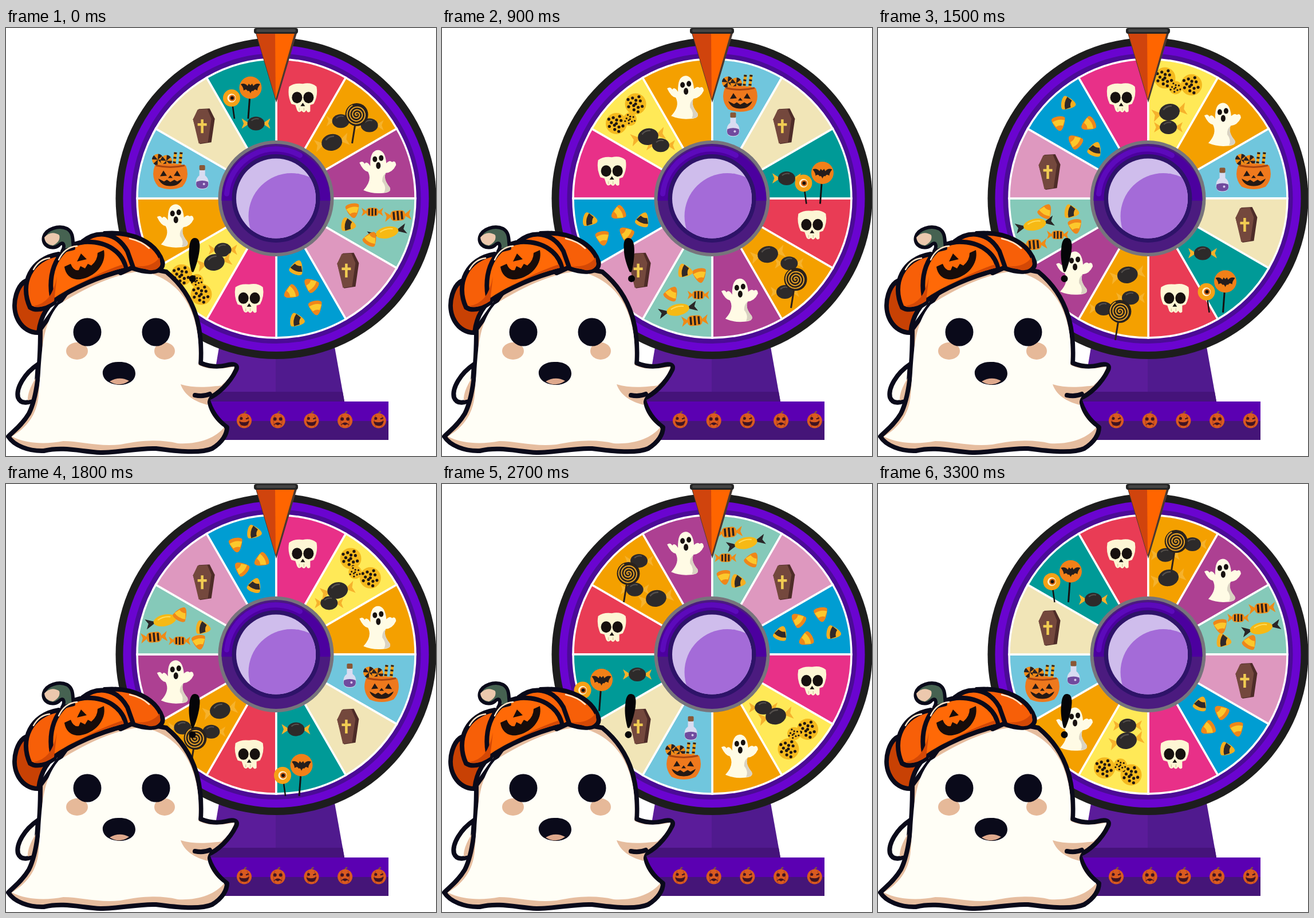
An HTML page for the animation above (3.6 s loop, 751 by 746 pixels).

```html
<!DOCTYPE html>
<html lang="en">
<head>
<meta charset="utf-8">
<title>Halloween wheel</title>
<style>
  html, body { margin: 0; width: 100%; height: 100%; overflow: hidden; background: #fff; }
  svg { display: block; width: 100vw; height: 100vh; }
  .ink { stroke: #0a0a1a; stroke-width: 8; stroke-linejoin: round; stroke-linecap: round; }
</style>
</head>
<body>
<svg viewBox="0 0 751 746">
  <!-- stand -->
  <path d="M374 545H471V651H356Z" fill="#5b1c9a"/>
  <path d="M471 545H572L591 651H471Z" fill="#501a8e"/>
  <path d="M358 634H588L591 651H355Z" fill="#45137a"/>
  <path d="M355 651H668V685H355Z" fill="#5b00b2"/>
  <path d="M355 685H668V718H355Z" fill="#451578"/>
  <g id="badges"></g>

  <!-- wheel -->
  <g transform="translate(471.5 297)">
    <circle r="280" fill="#1d1d1d"/>
    <circle r="267" fill="#6a04d0"/>
    <circle r="253" fill="#4b0b96"/>
  </g>
  <g transform="translate(472 297)">
    <g id="sectors" stroke="#fff" stroke-width="3.5"></g>
  </g>
  <g id="prizes"></g>
  <g transform="translate(471.5 297)">
    <circle r="101" fill="#77747c"/>
    <circle r="95" fill="#4b1b7f"/>
    <path d="M-95 4A95 95 0 0 1 95 4Z" fill="#4c009f"/>
    <path d="M-86-8A86 86 0 0 1 42-75" fill="none" stroke="#5c0abb" stroke-width="9" stroke-linecap="round"/>
    <circle r="77" fill="#2e1369"/>
    <circle r="69.5" fill="#cfbdec"/>
    <clipPath id="ball"><circle r="69.5"/></clipPath>
    <circle cx="27" cy="31" r="75" fill="#a46bd8" clip-path="url(#ball)"/>
  </g>

  <!-- pointer -->
  <path d="M436 9H508L472 130Z" fill="#4a3830"/>
  <path d="M437 9H471V124Z" fill="#d0440d"/>
  <path d="M470 9H504L471 124Z" fill="#ff6500"/>
  <rect x="433" width="77" height="10" rx="4" fill="#242424"/>
  <rect x="437" y="2" width="69" height="5" rx="2.5" fill="#444"/>

  <g id="alert" fill="#050508">
    <path d="M0-35C8-35 10-25 9-13C8 1 4 17 1 24Q-2 26-3 22C-6 12-10-2-9-16C-9-27-7-35 0-35Z"/>
    <circle cy="36" r="6"/>
  </g>

  <!-- ghost -->
  <path class="ink" d="M56 586C32 602 17 628 21 644C26 657 42 654 52 645Z" fill="#fffef6"/>
  <path d="M52 610Q37 634 38 649L52 646Z" fill="#e6bd9f"/>
  <path class="ink" d="M60 525C60 580 56 640 40 672C28 692 14 702 4 712C14 728 40 738 66 737C100 729 130 738 165 740C200 740 230 732 262 733C300 738 340 742 360 733C378 722 386 708 386 696C370 684 358 668 352 646C370 639 390 620 402 596C406 587 398 584 384 588C365 593 350 588 340 584C343 530 335 470 280 425L150 400Z" fill="#e6bd9f"/>
  <path d="M60 600C63 560 64 515 92 482C150 446 200 426 240 424C310 440 342 500 336 587C350 595 372 596 399 590C395 606 380 625 350 640C352 668 364 684 381 696C366 715 335 726 300 724C270 717 240 718 200 726C160 730 130 720 100 720C70 726 36 725 10 712C34 698 54 676 57 640Z" fill="#fffef6"/>
  <path d="M305 621C330 629 360 625 378 623C366 633 350 641 352 657C330 651 312 641 305 621Z" fill="#e6bd9f"/>
  <path class="ink" d="M330 640Q344 643 356 638" fill="none"/>
  <g fill="#e6b999">
    <ellipse cx="124" cy="563" rx="19" ry="15"/>
    <ellipse cx="277" cy="563" rx="18" ry="15"/>
  </g>
  <g fill="#0a0a1a">
    <circle cx="142" cy="530" r="24.5"/>
    <circle cx="262" cy="530" r="24.5"/>
    <path d="M169 598C172 587 184 581 199 582C216 582 226 591 226 602C226 615 213 622 199 622C182 622 167 613 169 598Z"/>
  </g>
  <path d="M181 616Q198 606 215 615Q198 627 181 616Z" fill="#dfa98d"/>

  <!-- pumpkin beret -->
  <g class="ink">
    <path d="M57 531C28 532 7 500 18 464C24 445 36 435 50 440L80 479Q60 500 57 531Z" fill="#c84104"/>
    <path d="M42 487C23 446 43 402 92 394L112 405L84 479Q58 497 42 487Z" fill="#f75f08"/>
    <path d="M172 358C222 354 262 374 273 407C278 424 254 430 222 419Z" fill="#f75f08"/>
    <path d="M134 372C158 353 192 354 212 389L222 417L200 427Z" fill="#fb6206"/>
    <path d="M82 477C69 427 91 377 137 373C178 371 205 392 210 421C167 432 121 450 82 477Z" fill="#ff6907"/>
    <path d="M98 389C104 379 100 370 92 379C80 388 62 379 66 364C70 350 92 343 107 350C119 357 116 372 118 384Z" fill="#466251" stroke-width="6"/>
  </g>
  <g fill="#d34806">
    <path d="M48 484Q80 481 89 433L84 476Q62 491 48 484Z"/>
    <path d="M87 470Q150 430 204 412L206 418Q145 432 87 470Z"/>
    <path d="M225 415Q255 418 268 400Q274 424 250 422Z"/>
  </g>
  <path d="M67 365Q79 352 93 361Q96 372 82 379Q68 377 67 365Z" fill="#ecc8ad"/>
  <path d="M48 421Q58 403 76 401M92 404Q102 382 124 380M216 367Q238 372 250 384" fill="none" stroke="#ffe4c8" stroke-width="2.5" stroke-linecap="round"/>
  <path d="M102 416L113 411Q118 424 127 422L130 415L138 419L143 411L149 414Q160 405 160 392L171 387C176 412 155 434 130 438C114 440 104 430 102 416ZM131 393L141 403L124 407Z" fill="#170c0a"/>
</svg>

<script>
const HUB = { x: 471.5, y: 297 };
const STEP_MS = 300;
const byId = id => document.getElementById(id);
const at = (x, y, art, extra = '') => `<g transform="translate(${x} ${y}) ${extra}">${art}</g>`;
const path = (d, fill) => `<path d="${d}" fill="${fill}"/>`;
const line = (d, color, width, dash = 'none') =>
  `<path d="${d}" fill="none" stroke="${color}" stroke-width="${width}" stroke-dasharray="${dash}"/>`;
const oval = (x, y, rx, ry, fill) => `<ellipse cx="${x}" cy="${y}" rx="${rx}" ry="${ry}" fill="${fill}"/>`;
const dot = (x, y, r, fill) => oval(x, y, r, r, fill);

// Prize artwork, each drawn around its own centre.
const ends = (w, h, fill) =>
  path(`M${-w * .45} 0L${-w}-${h}L${-w * .86} 0L${-w} ${h}ZM${w * .45} 0L${w}-${h}L${w * .86} 0L${w} ${h}Z`, fill);

const blackCandy = ends(25, 9, '#f6b22c') + oval(0, 0, 15, 12, '#2d2a2a') +
  line('M-8-5Q-2-10 5-8', '#55504d', 2);

const twist = ends(23, 9, '#f08a16') +
  '<rect x="-13" y="-9" width="26" height="18" rx="7" fill="#f08a16"/>' +
  line('M-7-7V7M0-8V8M7-7V7', '#29201f', 3.5);

const goldCandy = ends(34, 9, '#292627') + oval(0, 0, 20, 10, '#f6b914') +
  line('M-12-3Q0-8 11-4', '#ffdc5a', 2);

const corn = (base, band) =>
  path('M0-13C6-13 12 4 12 8C11 14-11 14-12 8C-12 4-6-13 0-13Z', base) +
  path('M-6-5Q0-2 6-5L11 4Q0 9-11 4Z', band);

const spiral = Array.from({ length: 90 }, (_, i) => {
  const a = i * .26, r = i * .2;
  return `${i ? 'L' : 'M'}${(r * Math.cos(a)).toFixed(1)} ${(r * Math.sin(a)).toFixed(1)}`;
}).join('');

// Chocolate chips follow a sunflower pattern.
const cookie = (r, n) => dot(0, 0, r, '#f4b91e') + Array.from({ length: n }, (_, i) => {
  const a = i * 2.4, d = r * .85 * Math.sqrt(i / n);
  return dot(d * Math.cos(a), d * Math.sin(a), r * .14, '#201711');
}).join('');

const pinwheel = (x, y) => line(`M${x} ${y}l7 20`, '#443', 2) + dot(x, y, 10, '#f08b18') +
  `<circle cx="${x}" cy="${y}" r="5" fill="none" stroke="#292122" stroke-width="10" stroke-dasharray="3.9"/>`;

const stripedStick = x => line(`M${x} -4l3 -27`, '#f5a51c', 5) + line(`M${x} -4l3 -27`, '#251d1b', 5, '3 5');

const art = {
  skull: path('M-24-20Q-14-27 0-25Q15-28 24-20Q27-4 19 10L13 12V23Q9 27 6 21Q2 28-2 22Q-7 27-10 21L-13 12L-20 10Q-27-4-24-20Z', '#fdf6d4') +
    oval(-10, -1, 9, 10, '#17110f') + oval(10, -1, 9, 10, '#17110f') +
    path('M0 8L4 14H-4Z', '#17110f') + line('M-6 17V22M2 17V22', '#d9cda5', 1.5),
  ghost: path('M-24 33Q-8 16-16 1Q-24 0-31-15Q-25-19-22-13Q-18-19-12-9Q-13-36 1-37Q14-37 16-14Q22-20 26-16Q32-20 33-11Q27 2 15 3Q10 14 22 28Q26 37 10 38Q-8 40-24 33Z', '#fffbe5') +
    path('M15 3Q10 14 22 28Q26 37 12 37Q17 28 9 18Q8 9 15 3Z', '#d9d2c2') +
    oval(-4, -21, 4, 5, '#17110f') + oval(7, -23, 4, 5, '#17110f') + oval(2, -10, 4, 6, '#17110f'),
  coffin: path('M-9-30L10-31L19-13L13 28L-7 31L-19-12Z', '#4e2c28') +
    path('M-11-29L6-30L13-13L7 28L-9 30L-19-12Z', '#74483d') +
    line('M-3-12V12M-11-3H5', '#f1cc52', 4.5),
  blackCandy,
  bigCandy: at(0, 0, blackCandy, 'rotate(-12) scale(1.2)'),
  twist: at(0, 0, twist, 'rotate(-5)'),
  smallTwist: at(0, 0, twist, 'scale(.82)'),
  goldCandy: at(0, 0, goldCandy, 'rotate(-12)'),
  corn: corn('#ef8619', '#fcc82c'),
  darkCorn: corn('#f5ae20', '#302929'),
  spiralPop: line('M0 0L-8 50', '#2c211b', 3) + dot(0, 0, 20, '#29221d') + line(spiral, '#e8a226', 2),
  batPop: line('M0 0L-4 54', '#141111', 3) + dot(0, 0, 19.5, '#f28018') +
    path('M-17-6Q-10-9-5-3L-3-7L0-4L3-7L5-3Q10-9 17-6Q12 0 12 5Q7 1 5 6Q2 4 0 10Q-2 4-5 6Q-7 1-12 5Q-12 0-17-6Z', '#251d1c'),
  eyePop: line('M0 0L5 36', '#141111', 2.5) + dot(0, 0, 15, '#f6a116') +
    dot(0, 0, 7.5, '#fff3cf') + dot(1, 0, 5.5, '#d4660e') + dot(1, 0, 3, '#161010'),
  cookie: cookie(18.5, 13),
  smallCookie: cookie(11.5, 10),
  basket: stripedStick(6) + stripedStick(16) + pinwheel(-22, -18) + pinwheel(-7, -16) +
    path('M-27-8Q0-15 27-8Q35 13 21 29Q0 38-21 29Q-35 13-27-8Z', '#ee791d') +
    line('M-25-8Q0-2 25-8', '#a94510', 3) +
    path('M-18 11L-12 1L-6 10ZM6 10L12 1L18 11ZM0 9L4 14H-4ZM-21 15L-11 20L-6 17L0 21L7 17L12 20L21 15Q16 28 0 28Q-16 28-21 15Z', '#241915'),
  potion: path('M-5-12H5V-3Q12 2 11 12Q11 21 0 21Q-11 21-11 12Q-12 2-5-3Z', '#d9dcf1') +
    path('M-10 8Q0 4 10 8Q13 20 0 20Q-13 20-10 8Z', '#704b9e') +
    '<rect x="-5" y="-21" width="10" height="9" rx="2" fill="#8a5735"/>' + dot(3, 12, 2, '#d8c9ee')
};

// A prize part: artwork, distance from the hub, degrees into the sector, upright offset.
const part = (name, radius, angle = 15, dx = 0, dy = 0) => ({ name, radius, angle, dx, dy });

const skull = [part('skull', 181)];
const ghost = [part('ghost', 183)];
const coffin = [part('coffin', 178)];
const lollipops = [part('blackCandy', 135), part('batPop', 198, 17), part('eyePop', 198, 17, -33, 18)];
const swirl = [part('blackCandy', 176, 10), part('blackCandy', 207, 22), part('bigCandy', 138), part('spiralPop', 203, 14)];
const sweets = [part('twist', 215, 8), part('goldCandy', 203, 17), part('smallTwist', 170, 8),
  part('corn', 136, 9), part('darkCorn', 135, 20), part('corn', 180, 23)];
const corns = [part('darkCorn', 126, 13), part('corn', 162, 8), part('corn', 166, 21),
  part('corn', 203, 10), part('darkCorn', 216, 20)];
const cookies = [part('blackCandy', 129, 16), part('bigCandy', 155, 14),
  part('cookie', 212, 8), part('cookie', 212, 21), part('smallCookie', 199, 14)];
const brew = [part('basket', 191), part('potion', 134, 16)];

// Sectors clockwise from the pointer: colour and prize.
const sectors = [
  ['#e93c55', skull], ['#f4a000', swirl], ['#ad4092', ghost], ['#85c9b9', sweets],
  ['#de98bf', coffin], ['#009dd2', corns], ['#e83088', skull], ['#ffe957', cookies],
  ['#f4a000', ghost], ['#70c6dd', brew], ['#f1e5b7', coffin], ['#009a97', lollipops]
];

// Parts travel with the wheel but stay upright; candy corn is scattered at its own tilt.
const drawPrize = (parts, sector) => parts.map(({ name, radius, angle, dx, dy }, i) => {
  const a = (sector * 30 + angle) * Math.PI / 180;
  const tilt = /corn/i.test(name) ? `rotate(${20 - i * 70})` : '';
  return at(HUB.x + radius * Math.sin(a) + dx, HUB.y - radius * Math.cos(a) + dy, art[name], tilt);
}).join('');

byId('sectors').innerHTML = sectors.map(([color], i) =>
  `<path d="M0 0V-243A243 243 0 0 1 121.5-210.4Z" fill="${color}" transform="rotate(${i * 30})"/>`).join('');

const ROUND = '#d95a20', CARVED = '#401322';
const badgeFace = sad => sad
  ? dot(-5, -3, 3, CARVED) + dot(5, -3, 3, CARVED) + path('M-8 8Q0-2 8 8L4 6L0 8L-4 6Z', CARVED)
  : dot(-5, -4, 2.5, CARVED) + line('M3-3L8-5', CARVED, 2) + path('M-9 1Q0 5 9 0Q7 10 0 9Q-7 9-9 1Z', CARVED);

byId('badges').innerHTML = Array.from({ length: 5 }, (_, i) => at(416 + i * 58.7, 684.5,
  line('M0-11Q0-15 4-16', '#81513d', 2.5) + oval(0, 0, 13, 13, ROUND) +
  line('M-5-10Q-10 0-5 11M5-10Q10 0 5 11', '#ad3b19', 1) + badgeFace(i % 2)
)).join('');

let shownStep = -1;

function render() {
  const step = Math.floor(performance.now() / STEP_MS) % 12;
  if (step !== shownStep) {
    shownStep = step;
    byId('sectors').setAttribute('transform', `rotate(${step * 30})`);
    byId('prizes').innerHTML = sectors.map(([, parts], i) => drawPrize(parts, i + step)).join('');
    // The mark leans right, with one sharp jerk to the left around the second step.
    const lean = 4 - 24 * Math.exp(-((step - 2) ** 2));
    byId('alert').setAttribute('transform', `translate(328 401) rotate(${lean})`);
  }
  requestAnimationFrame(render);
}
render();
</script>
</body>
</html>
```
